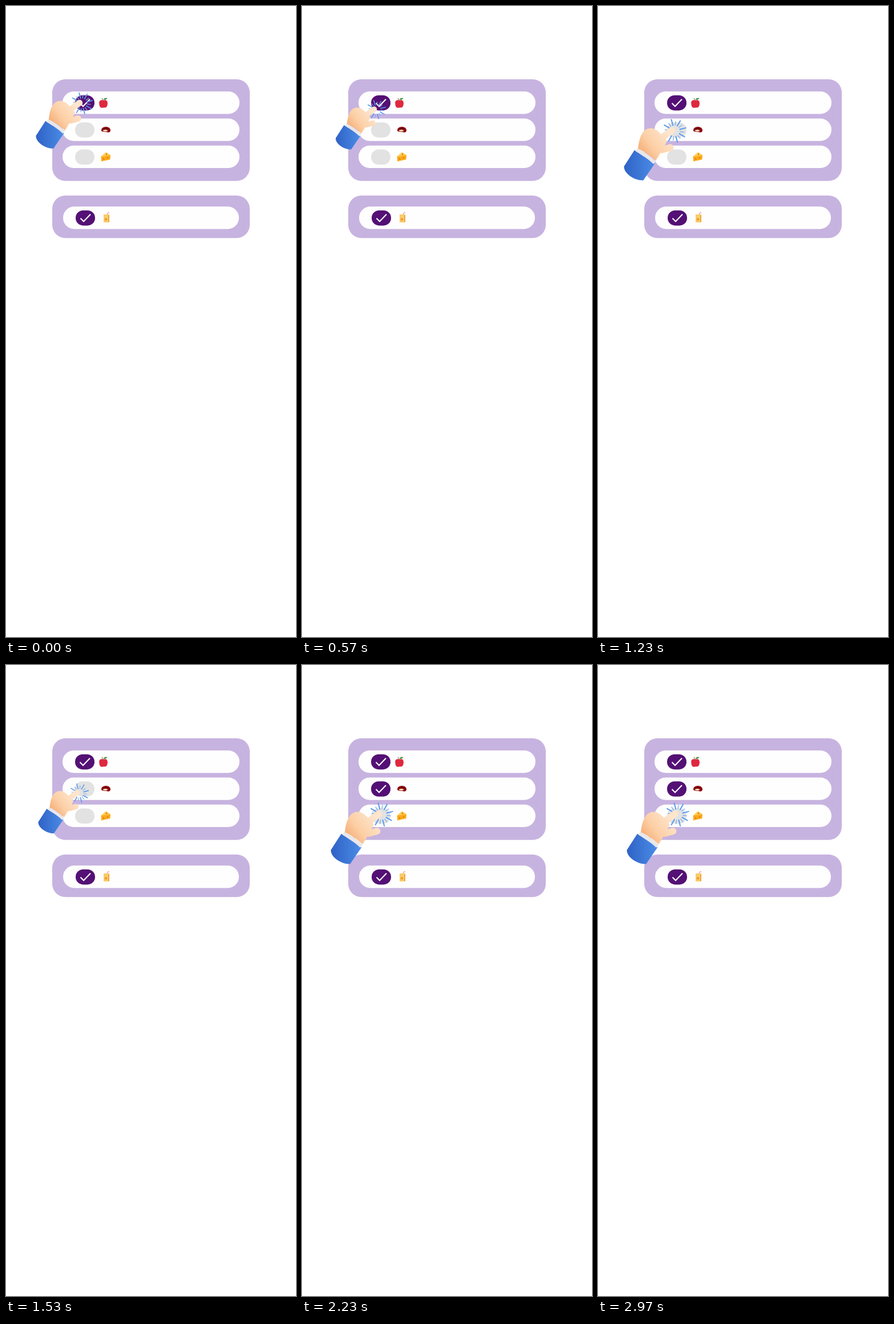
Write an HTML page that moves like this. It is 508 px wide and 1102 px high and loops after 3010 ms.

```html
<!DOCTYPE html>
<html lang="en">
<head>
<meta charset="utf-8">
<title>Checklist</title>
<style>
  html, body { margin: 0; width: 100%; height: 100%; overflow: hidden; background: #fff; }
  svg { display: block; width: 508px; height: 1102px; }
</style>
</head>
<body>
<svg viewBox="0 0 508 1102">
  <defs>
    <linearGradient id="skin" gradientUnits="userSpaceOnUse" x1="-64" y1="44" x2="-12" y2="4">
      <stop offset="0" stop-color="#f6ad76"/>
      <stop offset=".4" stop-color="#fccfa5"/>
      <stop offset="1" stop-color="#fee5cd"/>
    </linearGradient>
    <linearGradient id="sleeve">
      <stop offset="0" stop-color="#2f62c6"/>
      <stop offset="1" stop-color="#4b8ce6"/>
    </linearGradient>
  </defs>

  <g fill="#c7b3e0">
    <rect x="81" y="128" width="346" height="177.5" rx="23"/>
    <rect x="81" y="331" width="346" height="74.3" rx="23"/>
  </g>
  <g id="rows"></g>

  <g transform="translate(170.500 169)">
    <path d="M0 -4C-3 -6 -7.300 -4 -7.300 0C-7 11 -2 9 1 8.200C6 10 8 4 7.300 -1C6 -6 2 -5 0 -4Z" fill="#df2840"/>
    <path d="M0 -4L-2.500 -8" stroke="#7a4a36"/>
    <path d="M.3 -5.500Q2 -9.500 7 -8Q5 -4 .3 -5.500Z" fill="#4b963f"/>
  </g>
  <g transform="translate(175 216)">
    <path d="M-8 1C-8 -7 8 -7 8 1C8 5 4 5.500 1 4C-2 3 -8 5 -8 1Z" fill="#8e0b12"/>
    <ellipse cx="-1" cy="1.500" rx="4" ry="1.600" fill="#f3d9b0"/>
    <path d="M-5 -1Q0 -4 5 -1" fill="none" stroke="#4e060b"/>
  </g>
  <g transform="translate(175 263)">
    <path d="M-8.500 0L0 -7.500L8 -2.500L7.500 5L-8 8.500Z" fill="#fbab1e"/>
    <path d="M-8.500 0L0 -7.500L8 -2.500Z" fill="#ffd05a"/>
    <path d="M-4 4h0M3 2h0M1 -4h0" stroke="#e58410" stroke-width="3" stroke-linecap="round"/>
  </g>
  <g transform="translate(176 370)">
    <path d="M1 -5L2 -8.500L5 -9.300" fill="none" stroke="#ef7d82"/>
    <rect x="-5" y="-6" width="10" height="14" rx="1" fill="#f8cc6a"/>
    <path d="M4 -5V7" stroke="#e9a944" stroke-width="2"/>
    <circle cx="-1" cy="2.500" r="2.200" fill="#f39a2d"/>
  </g>

  <g id="hand">
    <g id="burst" stroke-linecap="round"></g>
    <path d="M-77 37L-97 68C-98 82 -76 96 -60 95L-38 63Z" fill="url(#sleeve)"/>
    <path d="M-73 36Q-55 45 -38 61" fill="none" stroke="#e8e7ea" stroke-width="7"/>
    <g stroke="url(#skin)" stroke-width="13" stroke-linecap="round">
      <path d="M-24 36L-8 32"/>
      <path d="M-24 13L-5 -1"/>
    </g>
    <path d="M-70 34C-68 14 -62 -5 -46 -5C-36 -5 -30 2 -24 8L-14 19L-24 38L-36 57Q-52 42 -70 34Z" fill="url(#skin)"/>
  </g>
</svg>
<script>
const LOOP = 3010;
const FPS = 30;
const LAST_FRAME = 89;

// Where each tap lands, and how far the hand hops on the way
const TAPS = [
  { x: 137, y: 176, hop: 20 },
  { x: 135, y: 219, hop: 0 },
  { x: 140, y: 262, hop: 0 }
];

const byId = id => document.getElementById(id);
const mix = (a, b, part) => a + (b - a) * part;

function add(parent, tag, attrs) {
  const node = document.createElementNS(parent.namespaceURI, tag);
  for (const name in attrs) node.setAttribute(name, attrs[name]);
  return parent.appendChild(node);
}

function addRow(x, y, width) {
  const row = add(byId("rows"), "g", { transform: `translate(${x} ${y})` });
  add(row, "rect", { width, height: 39.3, rx: 19.6, fill: "#fefefe" });
  const pill = add(row, "rect", { x: 22, y: 6.8, width: 34, height: 26.4, rx: 13 });
  const tick = add(row, "path", {
    d: "M30.500 20.500L36 26L48 13.500", fill: "none", stroke: "#fff", "stroke-width": 2.1
  });
  return checked => {
    pill.setAttribute("fill", checked ? "#541075" : "#e2e2e2");
    tick.setAttribute("visibility", checked ? "visible" : "hidden");
  };
}

const setRows = TAPS.map((_, i) => addRow(99, 149.2 + 47.3 * i, 310));
addRow(100, 350.2, 308)(true);

for (let i = 0; i < 16; i++) {
  const long = i % 2 === 0;
  add(byId("burst"), "line", {
    x1: 11, x2: long ? 22.5 : 18,
    stroke: long ? "#5a9aed" : "#82aeea",
    "stroke-width": long ? 2.2 : 1.5,
    transform: `rotate(${i * 22.5 - 105})`
  });
}

// The hand glides to its row, then swells and shrinks once
function handPose(index, phase) {
  const tap = TAPS[index];
  const previous = TAPS[Math.max(0, index - 1)];
  const glide = 1 - (1 - Math.min(1, phase / 0.1)) ** 3;
  const press = (1 - Math.cos(2 * Math.PI * (phase - 0.1))) / 2;
  const hop = tap.hop * Math.sin(Math.PI * Math.min(1, phase / 0.4));
  return {
    x: tap.x - mix(4, 7 * press, glide),
    y: mix(previous.y - 6, tap.y - 2 + 7 * press, glide) - hop,
    scale: 0.945 - 0.215 * press - 0.095 * (1 - glide)
  };
}

const start = performance.now();
function draw(now) {
  const time = Math.max(0, now - start) % LOOP;
  const frame = Math.min(LAST_FRAME, Math.floor(time * FPS / 1000 + 0.2));
  const index = Math.floor(frame / FPS);
  const { x, y, scale } = handPose(index, frame % FPS / FPS);
  byId("hand").setAttribute("transform", `translate(${x} ${y}) scale(${scale})`);
  setRows.forEach((setRow, i) => setRow(i < Math.max(1, index)));
  requestAnimationFrame(draw);
}
draw(start);
</script>
</body>
</html>
```
